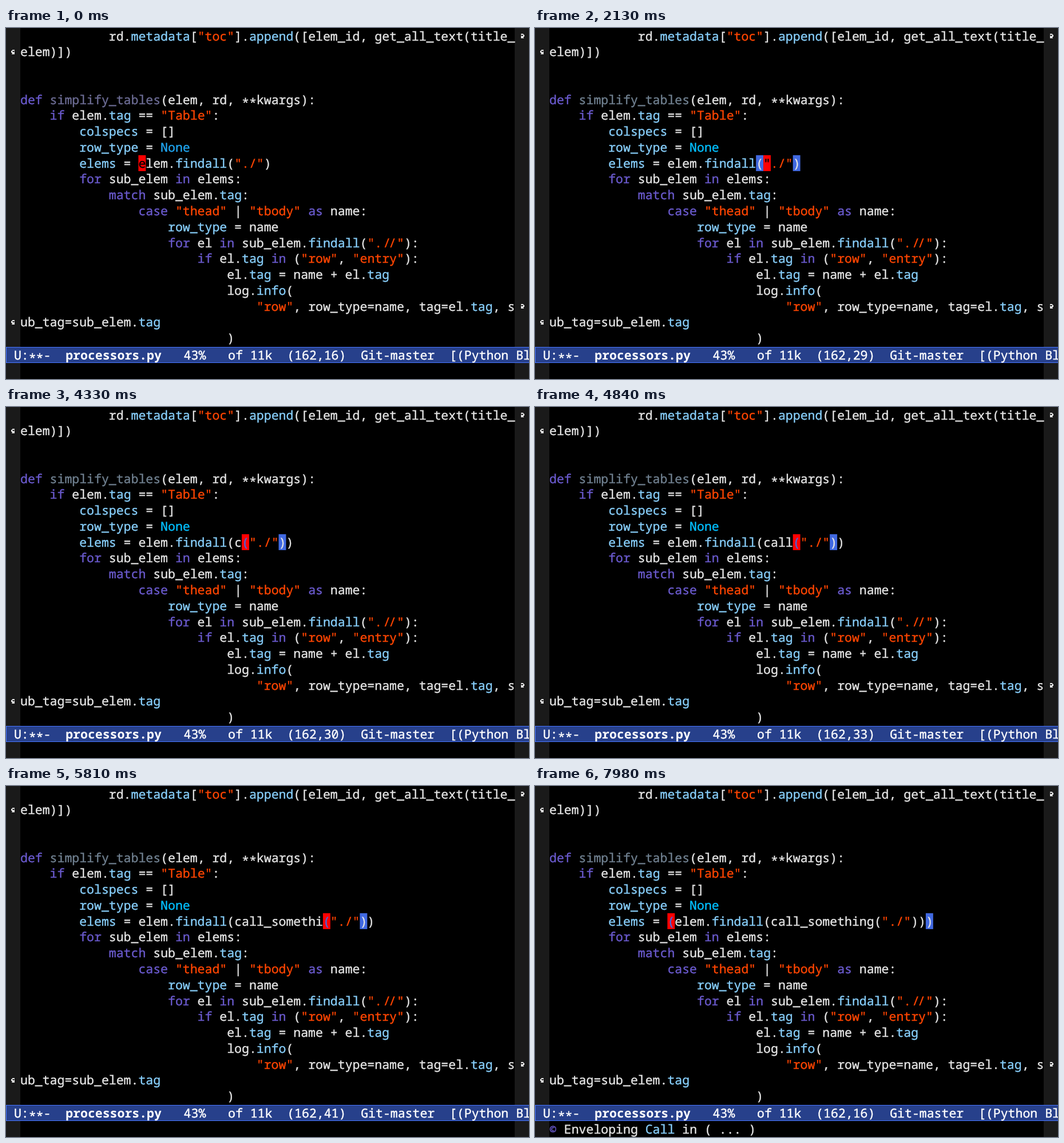
Recreate the animation shown at these times as an HTML page. Size 914 by 613 pixels, loop 8 s.

```html
<!DOCTYPE html>
<html lang="en">
<head>
<meta charset="utf-8">
<title>Editing Python</title>
<style>
  html, body { margin: 0; width: 100%; height: 100%; overflow: hidden; background: #000; }
  svg { display: block; width: 914px; height: 613px; }
  text {
    font: 21.5px "Noto Sans Mono", "DejaVu Sans Mono", monospace;
    white-space: pre; color: #e5e5e5;
    text-rendering: geometricPrecision; font-variant-ligatures: none;
  }
  text, tspan { fill: currentColor; stroke: currentColor; stroke-width: .4px; }
  .k { color: #6a5acd; }
  .v { color: #87cefa; }
  .s, .d { color: #ff4500; }
  .f { color: #708090; }
  .c { color: #00bfff; }
  .dim .f { color: #6c6c94; }
  .dim .c { color: #1fa5f0; }
  .a { baseline-shift: -4.5px; }
  .b { font-weight: 700; stroke-width: 0; }
  #mode { color: #fff; }
  .fringe { fill: #1a1a1a; }
  .wrap { fill: #e5e5e5; }
</style>
</head>
<body>
<svg id="stage" viewBox="0 0 914 613">
  <defs>
    <path id="curl" d="M2 0h4v1h-4zM1 1h5v1h-5zM0 2h2v1h-2zM0 3h3v1h-3zM5 3h1v1h-1zM0 4h6v1h-6zM1 5h5v1h-5zM2 6h4v1h-4zM1 7h5v1h-5z"/>
  </defs>
  <rect width="914" height="613"/>
  <rect class="fringe" width="25" height="613"/>
  <rect class="fringe" x="889" width="25" height="613"/>
  <g class="wrap">
    <use href="#curl" x="9" y="38"/>
    <use href="#curl" x="9" y="510"/>
    <use href="#curl" transform="translate(906 10) scale(-1 1)"/>
    <use href="#curl" transform="translate(906 482) scale(-1 1)"/>
  </g>
  <rect x=".5" y="557.5" width="920" height="27" fill="#27408b" stroke="#4876ff"/>
  <g id="code"></g>
  <text id="mode" x="1" y="579.2"></text>
  <text id="echo" x="25" y="607"></text>
</svg>
<script>
const NS = 'http://www.w3.org/2000/svg';
const CELL = 12.9, LINE = 27.77, LEFT = 25, BASE = 21.5, EDIT = 8;
const $ = id => document.getElementById(id);
const code = $('code');

// ~xWORD~ paints WORD with class x
const rows = [
  '            rd.~vmetadata~[~s"toc"~].~vappend~([elem_id, get_all_text(title_',
  'elem)])',
  '',
  '',
  '~kdef~ ~fsimplify_tables~(elem, rd, ~a**~kwargs):',
  '    ~kif~ elem.~vtag~ == ~s"Table"~:',
  '        ~vcolspecs~ = []',
  '        ~vrow_type~ = ~cNone~',
  '',
  '        ~kfor~ sub_elem ~kin~ elems:',
  '            ~kmatch~ sub_elem.~vtag~:',
  '                ~kcase~ ~s"thead"~ | ~s"tbody"~ ~kas~ name:',
  '                    ~vrow_type~ = name',
  '                    ~kfor~ el ~kin~ sub_elem.~vfindall~(~d".//"~):',
  '                        ~kif~ el.~vtag~ ~kin~ (~s"row"~, ~s"entry"~):',
  '                            el.~vtag~ = name + el.~vtag~',
  '                            log.~vinfo~(',
  '                                ~s"row"~, row_type=name, tag=el.~vtag~, s',
  'ub_tag=sub_elem.~vtag~',
  '                            )'
];

function add(tag, parent, attrs = {}) {
  const el = parent.appendChild(document.createElementNS(NS, tag));
  for (const key in attrs) el.setAttribute(key, attrs[key]);
  return el;
}

function paint(el, markup) {
  el.textContent = '';
  markup.split('~').forEach((part, i) => {
    if (i % 2 === 0) {
      el.append(part);
      return;
    }
    const span = add('tspan', el, { class: part[0] });
    span.textContent = part.slice(1);
    if (part[0] === 'd') span.setAttribute('dx', '0 0 2 -3 1');
  });
}

const lines = rows.map((row, i) => {
  const el = add('text', code, { x: LEFT, y: i * LINE + BASE });
  paint(el, row);
  return el;
});
const marks = add('g', code);

const call = arg => `elem.~vfindall~(${arg})`;
const str = '~s"./"~';
const plain = call(str);
const typed = n => call('call_something'.slice(0, n) + `(${str})`);
const note = kind => `~k©~ Enveloping ~v${kind}~ in ( ... )`;

// [time, expression, cursor column, matched parens, echo]
const steps = [
  [0, plain, 16],
  [1000, plain, 20],
  [1070, plain, 28, [28, 33]],
  [2130, plain, 29, [28, 33]],
  [2230, plain, 29],
  [3110, typed(0), 29, [29, 34], note('String')]
];
// 0: typed together with the next letter
[4330, 4680, 4760, 4840, 5090, 0, 5430, 5460, 5550, 5720, 5770, 5810, 5920, 5990].forEach((time, i) => {
  if (time) steps.push([time, typed(i + 1), 30 + i, [30 + i, 35 + i]]);
});
steps.push(
  [6620, typed(14), 34],
  [6780, typed(14), 29],
  [7100, typed(14), 16],
  [7980, `(${typed(14)})`, 16, [16, 51], note('Call')]
);

function cell(col, char, back, ink) {
  const x = LEFT + col * CELL;
  add('rect', marks, { x, y: EDIT * LINE, width: CELL, height: LINE, fill: back });
  const glyph = add('text', marks, { x, y: EDIT * LINE + BASE });
  glyph.style.color = ink;
  glyph.textContent = char;
}

function show([time, expr, cursor, match = [], echo = '']) {
  const row = '        ~velems~ = ' + expr;
  const chars = row.replace(/~(.)(.*?)~/g, '$2');
  code.classList.toggle('dim', time < 1000);
  paint(lines[EDIT], row);
  marks.textContent = '';
  for (const col of match) {
    if (col !== cursor) cell(col, chars[col], '#4169e1', '#e5e5e5');
  }
  cell(cursor, chars[cursor], '#f00', match.includes(cursor) ? '#4169e1' : '#000');
  paint($('mode'), ` U:~a**~-  ~bprocessors.py~   43%   of 11k  (162,${cursor})  Git-master  [(Python Bl`);
  paint($('echo'), echo);
}

const start = performance.now();
let current;
function tick() {
  const t = (performance.now() - start) % 8000;
  const step = steps.findLast(s => s[0] <= t);
  if (step !== current) show(current = step);
  requestAnimationFrame(tick);
}
tick();
</script>
</body>
</html>
```
